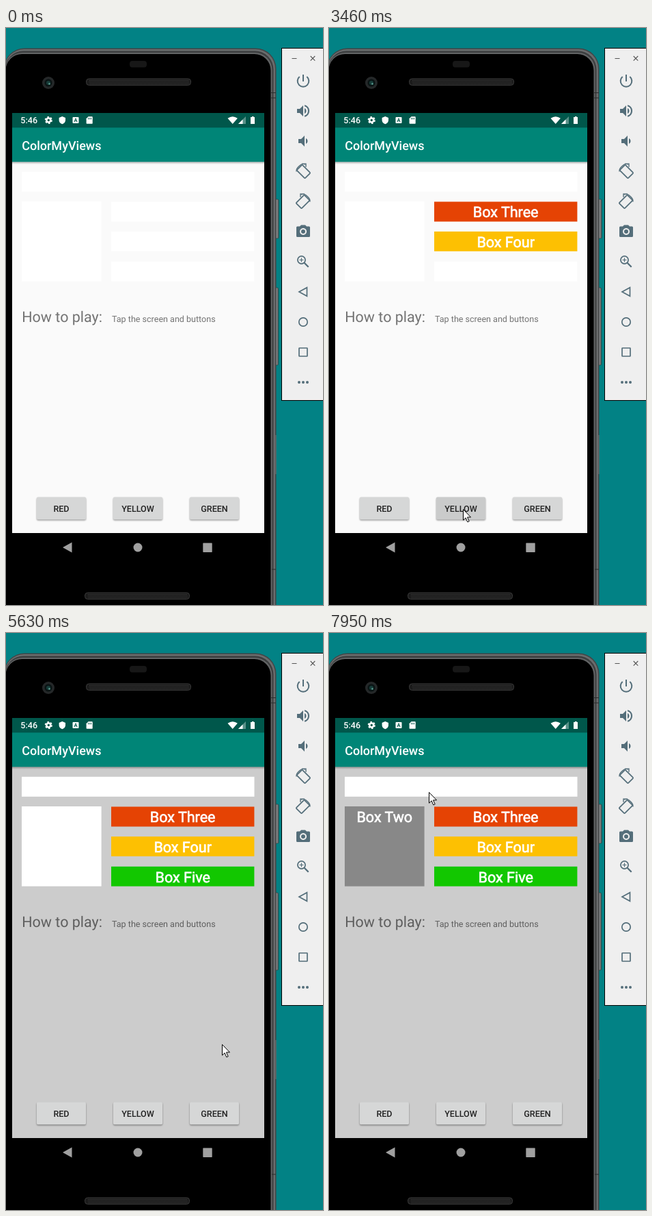
Animation of 464 by 842 pixels, one loop 8000 ms. Source, as an HTML page:

```html
<!DOCTYPE html>
<html lang="en">
<head>
<meta charset="utf-8">
<title>ColorMyViews</title>
<style>
html, body { margin: 0; width: 100%; height: 100%; overflow: hidden; background: #028285; }
svg { display: block; width: 464px; height: 842px; font-family: Roboto, sans-serif; text-rendering: geometricPrecision; }
.box text { font-size: 21.53px; fill: #fff; stroke: #fff; stroke-width: .65; text-anchor: middle; }
.button text { font-size: 12.56px; font-weight: 500; fill: #212121; text-anchor: middle; }
.line { fill: none; stroke: #546e7a; stroke-width: 1.7; }
.solid { fill: #546e7a; }
.dim { fill: #000; fill-opacity: .54; }
</style>
</head>
<body>
<svg viewBox="0 0 464 842">
  <defs>
    <linearGradient id="fall" x2="0" y2="1">
      <stop stop-opacity=".3"/><stop offset="1" stop-opacity="0"/>
    </linearGradient>
    <linearGradient id="key">
      <stop stop-color="#3c3e3f"/><stop offset=".6" stop-color="#8b8d8e"/><stop offset="1" stop-color="#5b5d5e"/>
    </linearGradient>
    <filter id="soft" x="-10%" y="-20%" width="120%" height="150%"><feGaussianBlur stdDeviation="1.1"/></filter>
  </defs>

  <!-- phone body -->
  <g fill="url(#key)" stroke="#333" stroke-width=".6">
    <rect x="392" y="250" width="7" height="57" rx="1.5"/>
    <rect x="392" y="379" width="6.5" height="113" rx="1.5"/>
  </g>
  <rect x="-3" y="29.5" width="398.5" height="900" rx="30" fill="#434546"/>
  <rect x="-2" y="31" width="396" height="900" rx="28.500" fill="#6a6c6d"/>
  <rect x="-1.500" y="33.500" width="393" height="900" rx="27" fill="#3c3e3f"/>
  <rect x="-1" y="36" width="390.500" height="900" rx="25" fill="#626465"/>
  <rect x="-.5" y="38" width="388" height="900" rx="24"/>
  <path d="M388 94.500h7M388 102h7M389 790h6" stroke="#2b2c2d" stroke-width="1.2"/>
  <path d="M395 594v57" stroke="#777"/>
  <rect x="181" y="48" width="25" height="9.500" rx="4" fill="#171717"/>
  <g id="speakers"></g>
  <circle cx="62" cy="80" r="9" fill="#252829"/>
  <circle cx="62" cy="80" r="5.500" fill="#0a1414"/>
  <circle cx="62" cy="80" r="3" fill="#173c39"/>
  <circle cx="63.500" cy="81.500" r="1.300" fill="#5fa295"/>

  <!-- app -->
  <rect id="page" x="9" y="195" width="369" height="542"/>
  <rect x="9" y="195" width="369" height="4" fill="url(#fall)"/>
  <rect x="9" y="145" width="369" height="50.300" fill="#008577"/>
  <rect x="9" y="124" width="369" height="21.400" fill="#00574b"/>
  <text x="23.200" y="177.600" font-size="18" font-weight="500" fill="#fff">ColorMyViews</text>

  <g fill="#fff">
    <text x="21.300" y="139.300" font-size="12.560" font-weight="500">5:46</text>
    <circle cx="62.300" cy="134.500" r="3" fill="none" stroke="#fff" stroke-width="2.600"/>
    <circle cx="62.300" cy="134.500" r="4.700" fill="none" stroke="#fff" stroke-width="1.800" stroke-dasharray="2.500 2.422"/>
    <path d="M82.300 129l4.700 2v3.500q0 4-4.700 5.700-4.700-1.700-4.700-5.700v-3.500z"/>
    <rect x="97.500" y="130" width="9" height="9" rx="1"/>
    <text x="102" y="137.300" font-size="7.500" font-weight="700" text-anchor="middle" fill="#00574b">A</text>
    <path d="M120.500 129.300h5.500q.7 0 .7.700v9q0 .8-.7.800h-7.600q-.8 0-.8-.8v-6.700z"/>
    <path d="M120.500 131v2.400m2-2.400v2.400m2-2.400v2.400" stroke="#00574b" stroke-width=".9"/>
    <path d="M324.500 131.700q7.200-5 14.400 0l-7.200 8.300z"/>
    <path d="M351 129v11h-11z" opacity=".35"/><path d="M346.500 133.500v6.500H340z"/>
    <path d="M360 129h2.500v1h1.500v10h-6v-10h2z"/>
  </g>

  <g id="boxes"></g>
  <text class="dim" x="23.200" y="429" font-size="21.530">How to play:</text>
  <text class="dim" x="155" y="429" font-size="12.560">Tap the screen and buttons</text>
  <g id="buttons"></g>

  <g fill="#a0a0a0">
    <path d="M83 758l13.500-7.500v15z"/>
    <circle cx="193" cy="758" r="6.500"/>
    <rect x="288.300" y="751.500" width="13.400" height="13.400" rx=".6"/>
  </g>

  <!-- emulator tools -->
  <rect x="403.500" y="29.500" width="70" height="514" fill="#efefef" stroke="#000"/>
  <path d="M418.500 44.500h7M445.700 41l6.600 6.600m0-6.600l-6.600 6.600" stroke="#555" stroke-width="1.100"/>
  <path class="line" d="M435 68v10M429.700 71a8.300 8.300 0 1 0 10.600 0" style="stroke-width:2"/>
  <g class="solid">
    <path transform="translate(423 109)" d="M3 9v6h4l5 5V4L7 9zM16.500 12c0-1.800-1-3.300-2.500-4v8c1.500-.7 2.500-2.200 2.500-4zM14 3.200v2.100a7 7 0 0 1 0 13.400v2.100a9 9 0 0 0 0-17.600z"/>
    <path transform="translate(423 153)" d="M18.500 12c0-1.800-1-3.300-2.500-4v8c1.500-.7 2.500-2.200 2.500-4zM5 9v6h4l5 5V4L9 9z"/>
    <path fill-rule="evenodd" d="M432 287.500h6l2 2h3.500q1.500 0 1.500 1.500v12.500q0 1.500-1.500 1.500h-17q-1.500 0-1.500-1.500v-12.500q0-1.500 1.500-1.500h3.500zM435 292a5 5 0 1 0 .1 0z"/>
    <circle cx="435" cy="297" r="3"/>
    <circle cx="429" cy="517" r="2"/><circle cx="435" cy="517" r="2"/><circle cx="441" cy="517" r="2"/>
  </g>
  <g class="line">
    <g id="turn">
      <rect x="-8.500" y="-5.700" width="17" height="11.400" rx="1.200" transform="translate(435.500 209.500) rotate(45)"/>
      <path d="M425 209.500q-.5-4 3.500-7.500l3-2.500q3-2 6.500-.5M433 198.300h6v4.500" stroke-width="1.400"/>
    </g>
    <use href="#turn" transform="translate(870 44) scale(-1 1)"/>
    <circle cx="432.500" cy="338.500" r="5.600"/>
    <path d="M436.700 342.700l6 6" stroke-width="2.300"/>
    <path d="M429.500 338.500h6m-3-3v6" stroke-width="1.200"/>
    <path d="M429 385l11.500-6.300v12.600z"/>
    <circle cx="435" cy="429" r="6.200"/>
    <rect x="429" y="467" width="12" height="12" rx=".5"/>
  </g>

  <circle id="tap" r="12" fill="#ff0" fill-opacity=".5"/>
  <path id="cursor" d="M.5.5v15.700l3.600-3.400 2.700 6.100 2.400-1-2.700-6h5z" fill="#fff" stroke="#000"/>
</svg>

<script>
const LOOP = 8000;
const $ = id => document.getElementById(id);

// x, y, width, height, label, label baseline, colour, time it is coloured
const BOXES = [
  [23, 209.8, 340.5, 29, '', 0, '#fff', LOOP],
  [23, 253, 116.6, 116.6, 'Box Two', 276, '#888', 7640],
  [154, 253.5, 209.4, 29, 'Box Three', 276.2, '#e54304', 2140],
  [154, 297, 209.4, 28.8, 'Box Four', 319.9, '#fdc002', 3450],
  [154, 340.8, 209.4, 28.8, 'Box Five', 363.6, '#12c700', 4620]
];

// left, label, pressed from, released at
const BUTTONS = [
  [45, 'RED', 2140, 2830],
  [157, 'YELLOW', 3380, 3840],
  [269, 'GREEN', 4550, 4930]
];

const TAPS = [[1910, 1990], [3220, 3300], [4300, 4470], [5480, 5550], [7420, 7480]];

// first step, last step, number of steps, x, y
const START = [408, 866];
const MOVES = [
  [290, 970, 10, 130, 691], [1050, 1050, 1, 117, 695],
  [1130, 1220, 2, 113, 696], [1360, 1360, 1, 111, 697],
  [2830, 2920, 2, 150, 694], [3070, 3150, 2, 196, 702],
  [3530, 3840, 5, 299, 701], [3920, 3920, 1, 309, 701], [4070, 4070, 1, 311, 701],
  [4930, 5085, 3, 320, 612], [5160, 5160, 1, 316, 600],
  [6010, 6240, 4, 151, 194], [6490, 6800, 5, 103, 275], [7720, 7950, 4, 146, 232]
];

$('speakers').innerHTML = [[117.5, 74], [115.5, 824]].map(([x, y]) =>
  `<rect x="${x}" y="${y}" width="153" height="9.5" rx="4" fill="#1b1b1b" stroke="#3a3a3a"/>` +
  [2.5, 4.8, 7.1].map(d =>
    `<path d="M${x + 4 + d % 2} ${y + d}h145" stroke="#414141" stroke-dasharray="1 1"/>`).join('')
).join('');

$('boxes').innerHTML = BOXES.map(([x, y, w, h, label, base]) =>
  `<g class="box"><rect x="${x}" y="${y}" width="${w}" height="${h}"/>` +
  `<text x="${x + w / 2}" y="${base}">${label}</text></g>`).join('');

$('buttons').innerHTML = BUTTONS.map(([x, label]) => {
  const face = `x="${x}" width="72" height="32.6" rx="1.8"`;
  return `<g class="button"><rect ${face} y="686" opacity=".4" filter="url(#soft)"/>` +
    `<rect class="face" ${face} y="684.6"/><text x="${x + 36}" y="705.8">${label}</text></g>`;
}).join('');

const boxes = [...document.querySelectorAll('.box')];
const faces = [...document.querySelectorAll('.face')];

function pointer(t) {
  let [x, y] = START;
  for (const [from, to, n, tx, ty] of MOVES) {
    if (t < from) break;
    const gap = n > 1 ? (to - from) / (n - 1) : 1;
    const k = Math.min(n, Math.floor((t - from) / gap + .01) + 1);
    const p = Math.sin(k / n * Math.PI / 2);
    x += (tx - x) * p;
    y += (ty - y) * p;
  }
  return `translate(${Math.round(x)} ${Math.round(y)})`;
}

function shade(t, from, to) {
  if (t < from || t >= to) return '#d6d7d7';
  return t < from + 75 ? '#d0d1d1' : t < from + 150 ? '#cacbcb' : '#c5c6c6';
}

function draw(t) {
  $('page').setAttribute('fill', t < 5630 ? '#fafafa' : '#ccc');
  BOXES.forEach(([, , , , , , color, at], i) => {
    const [rect, text] = boxes[i].children;
    rect.setAttribute('fill', t < at ? '#fff' : color);
    text.setAttribute('visibility', t < at ? 'hidden' : 'visible');
  });
  BUTTONS.forEach(([, , from, to], i) => faces[i].setAttribute('fill', shade(t, from, to)));
  const place = pointer(t);
  $('cursor').setAttribute('transform', place);
  $('tap').setAttribute('transform', place);
  $('cursor').setAttribute('visibility', t < 290 ? 'hidden' : 'visible');
  $('tap').setAttribute('visibility', TAPS.some(([a, b]) => t >= a && t < b) ? 'visible' : 'hidden');
}

const begin = performance.now();
function tick() {
  draw((performance.now() - begin) % LOOP);
  requestAnimationFrame(tick);
}
draw(0);
requestAnimationFrame(tick);
</script>
</body>
</html>
```
